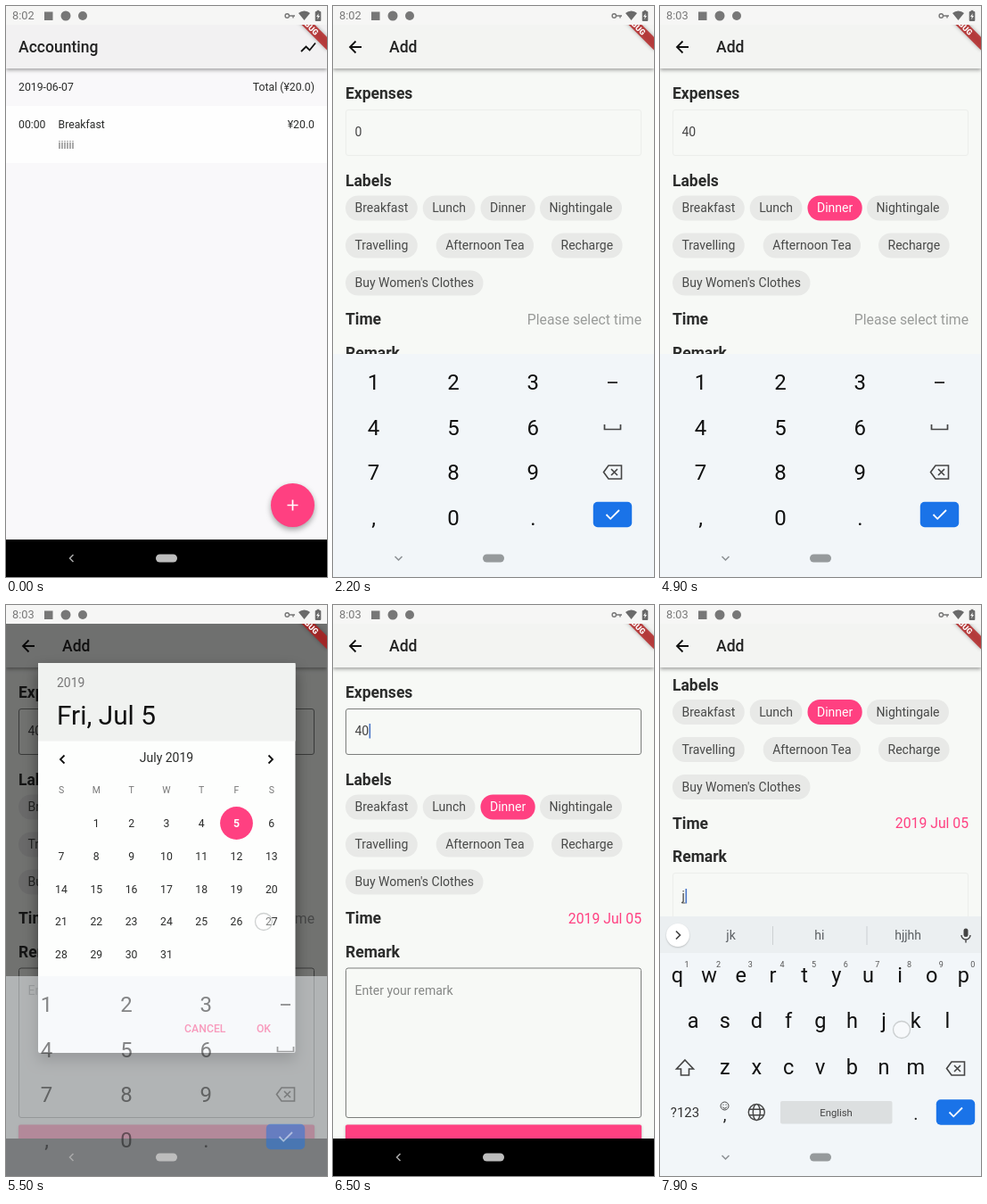
Write an HTML page with a canvas that moves like this. It is 360 by 640 pixels and loops after 8000 ms.

```html
<!DOCTYPE html>
<html lang="en">
<head>
<meta charset="utf-8">
<title>Accounting app</title>
<style>
html, body { margin: 0; width: 100%; height: 100%; overflow: hidden; background: #000; }
canvas { display: block; width: 360px; height: 640px; }
</style>
</head>
<body>
<canvas id="stage"></canvas>
<script>
const LOOP = 8000, STEP = 100;
const PINK = '#ff4081', BLUE = '#1a73e8', INK = '#2b2c2b', GREY = '#777', PAGE = '#f7f9f6';
const canvas = document.getElementById('stage');
const g = canvas.getContext('2d');
const dpr = window.devicePixelRatio || 1;
canvas.width = 360 * dpr;
canvas.height = 640 * dpr;

let t = 0;
const ramp = (a, b) => Math.min(1, Math.max(0, (t - a) / (b - a)));
const during = (a, b) => t >= a && t < b;
const easeOut = p => 1 - (1 - p) ** 3;

function text(s, x, y, size, color = INK, align = 'left', weight = 400) {
  g.font = `${weight} ${size}px Roboto, sans-serif`;
  g.textAlign = align;
  g.fillStyle = color;
  g.fillText(s, x, y);
}

function rect(x, y, w, h, color, radius = 0) {
  g.fillStyle = color;
  g.beginPath();
  g.roundRect(x, y, w, h, radius);
  g.fill();
}

function disc(x, y, r, color) {
  g.fillStyle = color;
  g.beginPath();
  g.arc(x, y, r, 0, 7);
  g.fill();
}

function icon(d, x, y, color, width = 1.7, fill = false) {
  g.save();
  g.translate(x, y);
  g.strokeStyle = g.fillStyle = color;
  g.lineWidth = width;
  fill ? g.fill(new Path2D(d)) : g.stroke(new Path2D(d));
  g.restore();
}

function layer(alpha, dy, draw) {
  if (alpha <= 0) return;
  g.save();
  g.globalAlpha = alpha;
  g.translate(0, dy);
  draw();
  g.restore();
}

function shadowed(blur, dy, alpha, draw) {
  g.save();
  g.shadowColor = `rgba(0,0,0,${alpha})`;
  g.shadowBlur = blur * dpr;
  g.shadowOffsetY = dy * dpr;
  draw();
  g.restore();
}

function appBar(title, x, color) {
  shadowed(4, 1.5, .35, () => rect(0, 0, 360, 70, color));
  text(title, x, 52.2, 17.5, '#222', 'left', 500);
}

function listPage() {
  rect(0, 0, 360, 640, '#f9f8fa');
  rect(0, 112, 360, 64, '#fefefe');
  text('2019-06-07', 14, 95.4, 12.26);
  text('Total (¥20.0)', 346, 95.4, 12.26, INK, 'right');
  text('00:00', 14, 137.4, 12.26);
  text('Breakfast', 58.5, 137.4, 12.26);
  text('¥20.0', 346, 137.4, 12.26, INK, 'right');
  text('iiiiii', 58.5, 160, 12.26, '#666');
  appBar('Accounting', 14, '#f2f1f2');
  icon('M-8 5L-2.5 -.5L1.5 3.5L8 -4.5', 339, 46, '#111', 1.8);
  shadowed(6, 3, .35, () => disc(321.5, 559.5, 24.5, PINK));
  if (during(1300, 1600)) disc(321.5, 559.5, 24.5, 'rgba(255,255,255,.2)');
  icon('M-6 0H6M0 -6V6', 321.5, 559.5, '#fff');
}

function chip(label, x, y, active) {
  g.font = '400 14px Roboto, sans-serif';
  rect(x, y - 14, g.measureText(label).width + 21, 28, active ? PINK : '#e8e9e7', 14);
  text(label, x + 10.5, y + 4.8, 14, active ? '#fff' : '#484948');
}

function field(y, h, focused) {
  g.strokeStyle = focused ? '#eceeeb' : '#7c7e7c';
  g.lineWidth = 1;
  g.beginPath();
  g.roundRect(14.5, y, 331, h, 2.5);
  g.stroke();
}

const caret = (x, y) => rect(x, y, 1.6, 16.5, '#4a76c8');
const heading = (s, y) => text(s, 14, y, 17.5, INK, 'left', 700);

function form() {
  heading('Expenses', 104);
  field(116.5, 51, t < 5300);
  text(t < 3300 ? '0' : '40', 24.5, 146, 14, '#444');
  if (during(1700, 2200) || during(2700, 3200)) caret(24, 133);
  if (during(3300, 3800) || during(4300, 4800)) caret(32, 133);
  if (during(6500, 6600)) caret(40.5, 133);

  heading('Labels', 202);
  chip('Breakfast', 14, 226.5);
  chip('Lunch', 100.7, 226.5);
  chip('Dinner', 165.5, 226.5, t >= 4800);
  chip('Nightingale', 232, 226.5);
  chip('Travelling', 14, 268.5);
  chip('Afternoon Tea', 115.7, 268.5);
  chip('Recharge', 245, 268.5);
  chip("Buy Women's Clothes", 14, 310.5);

  heading('Time', 357);
  const picked = t >= 6300;
  text(picked ? '2019 Jul 05' : 'Please select time', 346, 356.5, 15.76, picked ? PINK : '#999b99', 'right');

  heading('Remark', 394.5);
  field(407, 167.5, t >= 6700);
  const typed = t >= 7800;
  text(typed ? 'j' : 'Enter your remark', 24.5, 437, 14, typed ? '#444' : '#858785');
  if (typed) rect(24.5, 440, 4, 1, '#555');
  if (during(6700, 7200) || t >= 7700) caret(typed ? 28.5 : 24.5, 424.5);
  shadowed(3, 1, .3, () => rect(14, 582.5, 332, 32, PINK, 2));
}

function addPage() {
  rect(0, 0, 360, 640, PAGE);
  g.save();
  g.translate(0, -106.5 * easeOut(ramp(7000, 7300)));
  form();
  g.restore();
  appBar('Add', 63, '#f3f4f2');
  icon('M7 0H-6M.5 -6.5L-6 0L.5 6.5', 25, 46, '#111', 1.8);
}

function dialog() {
  shadowed(16, 8, .45, () => rect(36, 91, 288.5, 437, '#fdfefd', 2));
  rect(36, 91, 288.5, 87.5, '#f0f2f0');
  text('2019', 57, 117.7, 14, GREY);
  text('Fri, Jul 5', 57, 160.3, 29.8, '#111');
  text('July 2019', 180, 201.8, 14, INK, 'center');
  icon('M2 -4.5L-2.5 0L2 4.5', 63.5, 199, '#111', 1.8);
  icon('M-2 -4.5L2.5 0L-2 4.5', 296.5, 199, '#111', 1.8);
  const column = i => 62 + 39.3 * i;
  [...'SMTWTFS'].forEach((d, i) => text(d, column(i), 237.3, 10.5, GREY, 'center'));
  for (let day = 1; day <= 31; day++) {
    const x = column(day % 7), y = 270.5 + 36.8 * Math.floor(day / 7), on = day === 5;
    if (on) disc(x, y, 18.4, PINK);
    text(day, x, y + 4.4, 12.26, on ? '#fff' : INK, 'center', on ? 700 : 400);
  }
  if (t >= 6300) rect(262, 485, 55, 31, 'rgba(0,0,0,.03)', 2);
  text('CANCEL', 223.3, 505, 12.26, PINK, 'center', 500);
  text('OK', 289, 505, 12.26, PINK, 'center', 500);
}

const KEYS = '#f2f6f9';
const backspace = (x, y) => icon('M-10 0L-4.5 -7.5H10V7.5H-4.5ZM-1.5 -3.5L5.5 3.5M5.5 -3.5L-1.5 3.5', x, y, '#444', 1.6);

function enterKey(x, y) {
  rect(x - 21.7, y - 14.3, 43.4, 28.6, BLUE, 5);
  icon('M-7 0L-2.3 4.8L7.5 -5', x, y, '#fff', 1.8);
}

function numberPad() {
  rect(0, 390, 360, 300, KEYS);
  ['123', '456', '789', ',0.'].forEach((row, r) =>
    [...row].forEach((k, c) => text(k, 45.5 + 89.4 * c, 430 + 50.7 * r, 24, '#111', 'center')));
  icon('M-5.5 0H5.5', 313.5, 422, '#222', 1.8);
  icon('M-9 -3V2.5H9V-3', 313.5, 472, '#444');
  backspace(313.5, 522.5);
  enterKey(313.5, 570);
}

function letterKeys() {
  rect(0, 349, 360, 300, KEYS);
  rect(0, 349, 360, 41, '#ebeff1');
  shadowed(2, 1, .2, () => disc(20, 370, 13, '#fff'));
  icon('M-2 -4.5L2.5 0L-2 4.5', 20, 370, '#444');
  if (t >= 7800) {
    ['jk', 'hi', 'hjjhh'].forEach((s, i) => text(s, 79.5 + 99.3 * i, 375, 14, '#5c6064', 'center'));
    rect(126, 360, 1, 21, '#ccd0d3');
    rect(231.5, 360, 1, 21, '#ccd0d3');
  }
  rect(340.5, 362.5, 5, 9.5, '#444', 2.5);
  icon('M-5 -1A5 5 0 0 0 5 -1M0 4V7.5', 343, 371, '#444', 1.4);

  [['qwertyuiop', 19.5], ['asdfghjkl', 37.2], ['zxcvbnm', 72.8]].forEach(([row, left], r) =>
    [...row].forEach((k, i) => {
      const x = left + 35.65 * i;
      text(k, x, 422.7 + 51.5 * r, 23.5, '#111', 'center');
      if (!r) text((i + 1) % 10, x + 10.5, 405.5, 9, '#555', 'center');
    }));
  icon('M0 -9L9.5 1H4.5V8H-4.5V1H-9.5Z', 28, 519, '#444', 1.6);
  backspace(331.5, 519.5);

  text('?123', 28, 574, 15, '#333', 'center');
  icon('M4.5 0A4.5 4.5 0 1 1 -4.5 0A4.5 4.5 0 1 1 4.5 0M-2.3 1A2.4 2.4 0 0 0 2.3 1M-1.6 -2V-.8M1.6 -2V-.8', 72.5, 561.5, '#444', 1);
  text(',', 72.5, 578, 19, '#222', 'center');
  icon('M9 0A9 9 0 1 1 -9 0A9 9 0 1 1 9 0M4 0A4 9 0 1 1 -4 0A4 9 0 1 1 4 0M-8 -3.2H8M-8 3.2H8', 108.3, 568.5, '#444', 1.4);
  rect(135, 556, 125.5, 25.5, '#dcdfe0', 2);
  text('English', 197.5, 573, 11.3, '#444', 'center');
  text('.', 287, 577, 20, '#222', 'center');
  enterKey(331.5, 568.5);
}

function navIcons(light) {
  if (light) icon('M-4 -2L0 2L4 -2', 73.5, 619, '#8b8f92', 1.5);
  else icon('M2 -4L-2 0L2 4', 73.5, 619, '#aaa', 1.5);
  rect(168, 614.5, 24, 9, light ? '#969a9c' : '#bdbdbd', 4.5);
}

function debugBanner() {
  g.save();
  g.translate(360, 0);
  g.rotate(Math.PI / 4);
  shadowed(4, 0, .4, () => rect(-35, 24.5, 70, 10.5, 'rgba(183,28,28,.78)'));
  text('DEBUG', 0, 33, 8.9, '#fff', 'center', 900);
  g.restore();
}

function statusBar() {
  rect(0, 0, 360, 21, '#f6f6f5');
  text(t < 3200 ? '8:02' : '8:03', 7, 15.3, 12.8, GREY);
  rect(43, 6.5, 9.5, 9.5, GREY);
  disc(67, 11, 5.5, GREY);
  disc(86, 11, 5, GREY);
  icon('M-1 0A2.2 2.2 0 1 1 -5.4 0A2.2 2.2 0 1 1 -1 0M-1 0H5.5M3.5 0V2.5', 318.5, 11, GREY, 1.4);
  icon('M-6.5 -2.5A9.5 9.5 0 0 1 6.5 -2.5L0 5.5Z', 334.5, 10.5, '#6a6a6a', 1, true);
  rect(346.7, 6, 6.6, 11, '#6a6a6a', 1);
  rect(348.6, 4.8, 2.8, 2, '#6a6a6a');
  icon('M.7 -3.2L-2 .6H-.3L-.7 3.4L2 -.5H.3Z', 350, 11.5, '#f6f6f5', 1, true);
}

// start, end, x, y
const touches = [
  [1300, 1500, 321, 559], [3100, 3400, 46, 473], [4600, 4900, 196, 228],
  [5300, 5600, 289, 355], [6300, 6500, 286, 510], [6600, 6700, 150, 480], [7600, 8000, 271, 476],
];

function touchMarks() {
  for (const [start, end, x, y] of touches) {
    if (!during(start, end)) continue;
    disc(x, y, 10, 'rgba(255,255,255,.4)');
    icon('M9.5 0A9.5 9.5 0 1 1 -9.5 0A9.5 9.5 0 1 1 9.5 0', x, y, 'rgba(120,125,125,.35)', 1.3);
  }
}

function draw() {
  g.setTransform(dpr, 0, 0, dpr, 0, 0);
  const enter = ramp(1400, 1700);
  const picker = ramp(5300, 5450) * (1 - ramp(6300, 6500));
  const pad = ramp(1600, 1800) * (1 - ramp(5400, 5600));
  const letters = ramp(6900, 7100);

  if (enter < 1) listPage();
  layer(enter, 160 * (1 - easeOut(enter)), addPage);
  layer(picker, 0, () => rect(0, 0, 360, 640, 'rgba(0,0,0,.54)'));
  layer(picker, -52 * (1 - ramp(5400, 5600)), dialog);
  debugBanner();
  rect(0, 598, 360, 42, '#000');
  layer(pad, 52 * (1 - pad), numberPad);
  layer(letters, 52 * (1 - letters), letterKeys);
  navIcons(Math.max(pad, letters) > .5);
  statusBar();
  touchMarks();
}

function tick() {
  t = Math.floor(performance.now() % LOOP / STEP) * STEP;
  draw();
  requestAnimationFrame(tick);
}
tick();
</script>
</body>
</html>
```
